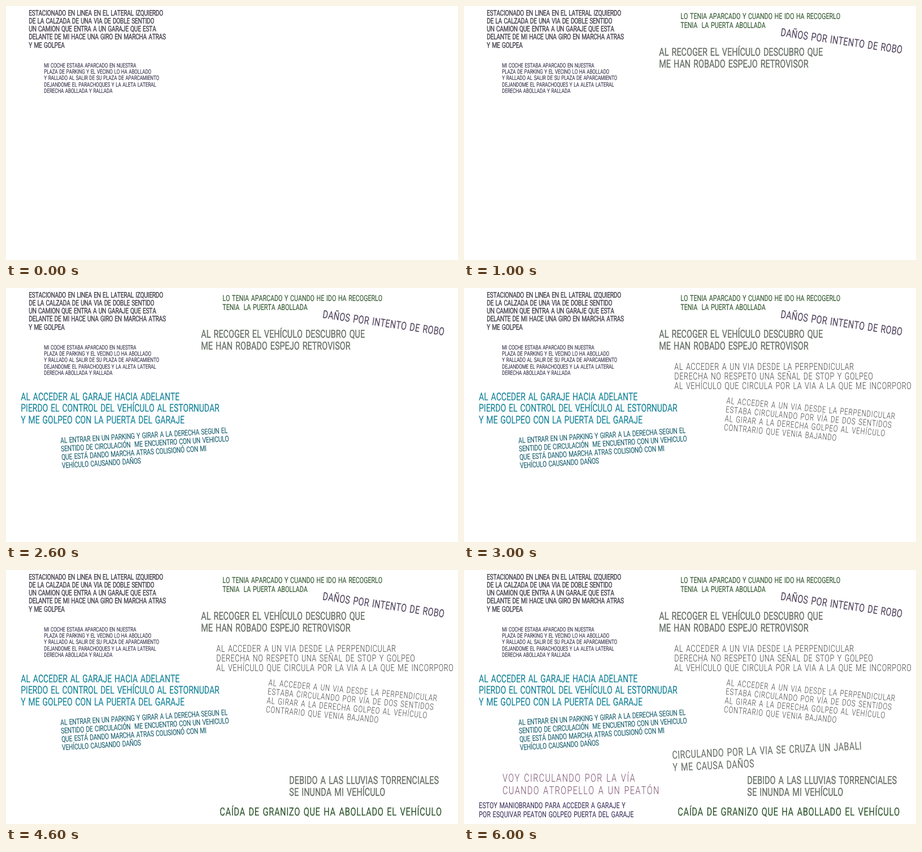
An HTML page for the animation above (7000 ms loop, 800 by 450 pixels).

```html
<!DOCTYPE html>
<html lang="es">
<head>
<meta charset="utf-8">
<title>Partes de accidente</title>
<style>
html, body { margin: 0; width: 100%; height: 100%; overflow: hidden; background: #fff; }
svg { display: block; width: 800px; height: 450px; }
text {
  font-family: Roboto, sans-serif;
  font-kerning: none;
  word-spacing: .1em;
  text-rendering: geometricPrecision;
}
.thin { font-weight: 300; }
.mid, .bold { stroke: currentColor; stroke-width: .15; stroke-linejoin: round; }
.bold { stroke-width: .4; }

/* each step appears on its own second and stays until the loop restarts */
.step { animation: 7s step-end infinite; }
.s1 { animation-name: s1; }
.s2 { animation-name: s2; }
.s3 { animation-name: s3; }
.s4 { animation-name: s4; }
.s5 { animation-name: s5; }
.s6 { animation-name: s6; }
@keyframes s1 { 0% { visibility: hidden } 14.2857%, 100% { visibility: visible } }
@keyframes s2 { 0% { visibility: hidden } 28.5714%, 100% { visibility: visible } }
@keyframes s3 { 0% { visibility: hidden } 42.8571%, 100% { visibility: visible } }
@keyframes s4 { 0% { visibility: hidden } 57.1428%, 100% { visibility: visible } }
@keyframes s5 { 0% { visibility: hidden } 71.4285%, 100% { visibility: visible } }
@keyframes s6 { 0% { visibility: hidden } 85.7142%, 100% { visibility: visible } }
</style>
</head>
<body>
<svg id="stage" viewBox="0 0 800 450"></svg>
<script>
const NS = "http://www.w3.org/2000/svg";
const CONDENSE = 0.74; // one narrow face for all notes
const CAP = 0.711;     // cap height in em
const stage = document.getElementById("stage");
const steps = [];

function add(parent, tag, attrs) {
  const el = document.createElementNS(NS, tag);
  for (const key in attrs) el.setAttribute(key, attrs[key]);
  return parent.appendChild(el);
}

for (let i = 0; i < 7; i++) steps.push(add(stage, "g", { class: i ? "step s" + i : "" }));

// x, y: left edge and vertical middle of the first line's capitals
function note(step, { x, y, size, color, lead = 0, track = 0, angle = 0, weight = "mid" }, ...lines) {
  const g = add(steps[step], "g", {
    class: weight, fill: color, color,
    "font-size": size,
    transform: `translate(${x - 0.7} ${y}) rotate(${angle}) scale(${CONDENSE} 1)`
  });
  g.style.letterSpacing = track + "em";
  lines.forEach((line, i) => {
    add(g, "text", { x: 0, y: size * CAP / 2 + i * lead }).textContent = line;
  });
}

note(0, { x: 41, y: 12, size: 13.75, lead: 14.2, track: -.024, color: "#47434f", weight: "bold" },
  "ESTACIONADO EN LINEA EN EL LATERAL IZQUIERDO",
  "DE LA CALZADA DE UNA VIA DE DOBLE SENTIDO",
  "UN CAMION QUE ENTRA A UN GARAJE QUE ESTA",
  "DELANTE DE MI HACE UNA GIRO EN MARCHA ATRAS",
  "Y ME GOLPEA");
note(0, { x: 68, y: 105, size: 10.9, lead: 11.3, track: -.014, color: "#3c3850" },
  "MI COCHE ESTABA APARCADO EN NUESTRA",
  "PLAZA DE PARKING Y EL VECINO LO HA ABOLLADO",
  "Y RALLADO AL SALIR DE SU PLAZA DE APARCAMIENTO",
  "DEJANDOME EL PARACHOQUES Y LA ALETA LATERAL",
  "DERECHA ABOLLADA Y RALLADA");

note(1, { x: 384, y: 18, size: 14.5, lead: 15.6, track: -.003, color: "#32582f" },
  "LO TENIA APARCADO Y CUANDO HE IDO HA RECOGERLO",
  "TENIA\u00a0 LA PUERTA ABOLLADA");
note(1, { x: 561.5, y: 46, size: 19.4, track: .022, angle: 8.3, color: "#544660" },
  "DAÑOS POR INTENTO DE ROBO");
note(1, { x: 346, y: 81, size: 19.4, lead: 21.3, track: .003, color: "#687068", weight: "bold" },
  "AL RECOGER EL VEHÍCULO DESCUBRO QUE",
  "ME HAN ROBADO ESPEJO RETROVISOR");

note(2, { x: 27, y: 192, size: 18.9, lead: 20.4, color: "#0f8098" },
  "AL ACCEDER AL GARAJE HACIA ADELANTE",
  "PIERDO EL CONTROL DEL VEHÍCULO AL ESTORNUDAR",
  "Y ME GOLPEO CON LA PUERTA DEL GARAJE");
note(2, { x: 97, y: 270, size: 14, lead: 14.8, track: -.02, angle: -3.5, color: "#1a6070" },
  "AL ENTRAR EN UN PARKING Y GIRAR A LA DERECHA SEGUN EL",
  "SENTIDO DE CIRCULACIÓN\u00a0 ME ENCUENTRO CON UN VEHICULO",
  "QUE ESTÁ DANDO MARCHA ATRAS COLISIONÓ CON MI",
  "VEHÍCULO CAUSANDO DAÑOS");

note(3, { x: 373, y: 138.5, size: 17, lead: 17.2, track: .047, color: "#404040", weight: "thin" },
  "AL ACCEDER A UN VIA DESDE LA PERPENDICULAR",
  "DERECHA NO RESPETO UNA SEÑAL DE STOP Y GOLPEO",
  "AL VEHÍCULO QUE CIRCULA POR LA VIA A LA QUE ME INCORPORO");
note(3, { x: 465.5, y: 199, size: 15.5, lead: 15.9, track: .068, angle: 5.35, color: "#404040", weight: "thin" },
  "AL ACCEDER A UN VIA DESDE LA PERPENDICULAR",
  "ESTABA CIRCULANDO POR VÍA DE DOS SENTIDOS",
  "AL GIRAR A LA DERECHA GOLPEO AL VEHÍCULO",
  "CONTRARIO QUE VENIA BAJANDO");

note(4, { x: 502, y: 372, size: 19.4, lead: 21.5, track: .006, color: "#687068", weight: "bold" },
  "DEBIDO A LAS LLUVIAS TORRENCIALES",
  "SE INUNDA MI VEHÍCULO");
note(4, { x: 379, y: 427.5, size: 19.8, track: .045, color: "#2a5228" },
  "CAÍDA DE GRANIZO QUE HA ABOLLADO EL VEHÍCULO");

note(5, { x: 69, y: 368, size: 19.4, lead: 21.7, track: .1, color: "#744a6a", weight: "thin" },
  "VOY CIRCULANDO POR LA VÍA",
  "CUANDO ATROPELLO A UN PEATÓN");
note(5, { x: 27, y: 417, size: 14.5, lead: 15.8, color: "#40365f" },
  "ESTOY MANIOBRANDO PARA ACCEDER A GARAJE Y",
  "POR ESQUIVAR PEATON GOLPEO PUERTA DEL GARAJE");

note(6, { x: 369, y: 327.5, size: 19.4, lead: 22, track: .031, angle: -2.8, color: "#687068" },
  "CIRCULANDO POR LA VIA SE CRUZA UN JABALI",
  "Y ME CAUSA DAÑOS");
</script>
</body>
</html>
```
